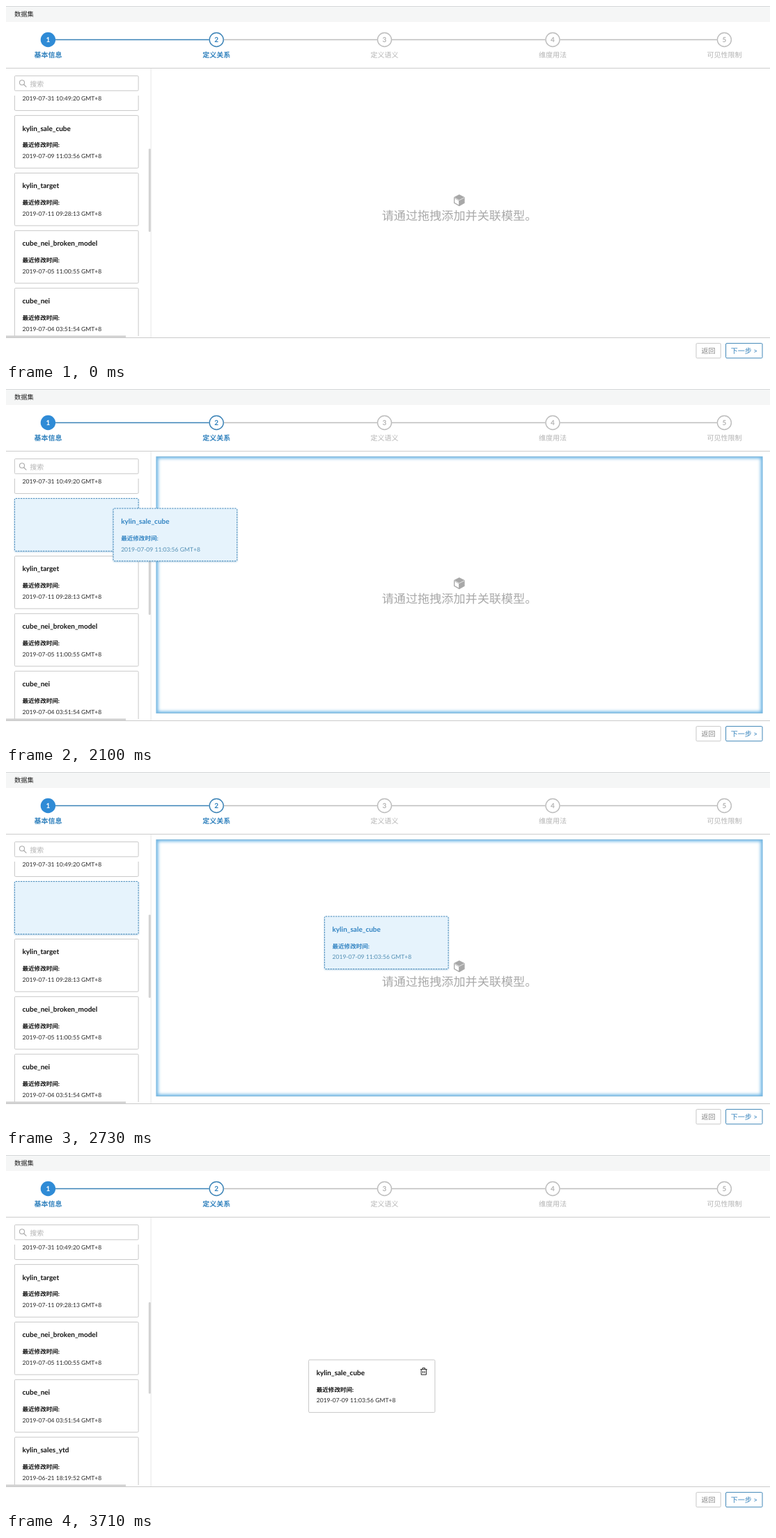
An HTML page that plays this animation: 1097 px wide and 511 px high, repeating every 4.27 s.

```html
<!DOCTYPE html>
<html lang="zh-CN">
<head>
<meta charset="utf-8">
<title>数据集</title>
<style>
  html, body { margin: 0; width: 100%; height: 100%; overflow: hidden; background: #fff; }
  svg { display: block; width: 1097px; height: 511px; }
  text {
    font-family: Lato, "Noto Sans CJK SC", "Noto Sans CJK", sans-serif;
    font-size: 10px;
    text-rendering: geometricPrecision;
    white-space: pre;
  }
  .mid { text-anchor: middle; }
  .bold { font-weight: 700; }
  .small { font-size: 8.57px; }
  .box { fill: #fff; stroke: #c8c8c8; stroke-width: 1; }
  .card { fill: #111; }
  .card .date { fill: #2b2b2b; }
  .blue { fill: #3183c2; }
  .blue .date { fill: #5490b5; }
  .blue .box {
    fill: #e6f3fc;
    stroke: #3f86b8;
    stroke-dasharray: 2.2 1.4;
    filter: drop-shadow(0 1px 1px rgba(70, 140, 190, .45));
  }
</style>
</head>
<body>
<svg id="stage" viewBox="0 0 1097 511" xmlns="http://www.w3.org/2000/svg">
  <defs>
    <clipPath id="listClip"><rect x="0" y="129" width="204" height="346"/></clipPath>
    <clipPath id="zoneClip"><rect x="215.5" y="97" width="871" height="370"/></clipPath>
    <filter id="glow" x="-5%" y="-5%" width="110%" height="110%"><feGaussianBlur stdDeviation="2"/></filter>
  </defs>
  <rect width="1097" height="511" fill="#fff"/>
  <rect width="1097" height="23" fill="#f5f6f6"/>
  <rect width="1097" height="1" fill="#d6d8d9"/>
  <text x="12" y="15.2" style="font-size:9.3px" fill="#222">数据集</text>
  <g id="steps"></g>
  <rect y="89" width="1097" height="1" fill="#cdcdcd"/>

  <rect x="207.6" y="90" width="1" height="387" fill="#e6e6e6"/>
  <rect class="box" x="12.4" y="100.6" width="177.7" height="21.3" rx="1.2"/>
  <g fill="none" stroke="#aaa" stroke-width="1.1" stroke-linecap="round">
    <circle cx="23" cy="110.3" r="3.5"/>
    <path d="M25.6 113L29 116.4"/>
  </g>
  <text x="34.2" y="115.7" fill="#b4b4b4">搜索</text>
  <g clip-path="url(#listClip)">
    <g id="listA"></g>
    <g id="listB"></g>
  </g>
  <rect id="thumb" x="204.8" width="3" rx="1" fill="#d2d2d2"/>

  <g id="zone" clip-path="url(#zoneClip)" fill="none">
    <rect x="215.5" y="97" width="871" height="370" stroke="#6db6e6" stroke-width="6" filter="url(#glow)"/>
    <rect x="216" y="97.5" width="870" height="369" stroke="#82b9db"/>
  </g>
  <g id="hint">
    <path d="M650.8 271.2L658.6 275.2V283.8L650.8 288.2L643 283.8V275.2Z" fill="#a8a8a8"/>
    <path d="M644.3 277.2L650.1 280.2V286.3L644.3 283.1Z" fill="#fff"/>
    <path d="M643.6 275.9L650.8 279.6L658 275.9" fill="none" stroke="#fff" stroke-width=".7"/>
    <text class="mid" x="651" y="308" style="font-size:17.14px" fill="#a9a9a9">请通过拖拽添加并关联模型。</text>
  </g>
  <g id="dropped"></g>

  <rect y="474.4" width="172" height="3.2" fill="#d2d2d2"/>
  <rect y="477" width="1097" height="1" fill="#cbcbcb"/>
  <rect class="box" x="991" y="485.6" width="35.2" height="21.2" rx="1.4"/>
  <text class="mid" x="1008.6" y="499.8" fill="#858585">返回</text>
  <rect class="box" x="1033.6" y="485.6" width="52.4" height="21.2" rx="1.4" style="stroke:#3f86b8"/>
  <text class="mid" x="1059.9" y="499.8" fill="#2f7fba">下一步 &gt;</text>
  <g id="drag"></g>
</svg>
<script>
const LOOP = 4270, TICK = 70;
const PICK = 1470, LIFT = 2030, DROP = 3150, LEAVE = 3710;
const LEFT = 12.4, TOP = 157.6, PITCH = 82.86, CARD_W = 177.7;
const $ = id => document.getElementById(id);

const sale = ['kylin_sale_cube', '2019-07-09 11:03:56 GMT+8'];
const rest = [
  ['kylin_target', '2019-07-11 09:28:13 GMT+8'],
  ['cube_nei_broken_model', '2019-07-05 11:00:55 GMT+8'],
  ['cube_nei', '2019-07-04 03:51:54 GMT+8'],
  ['kylin_sales_ytd', '2019-06-21 18:19:52 GMT+8']
];
const above = ['', '2019-07-31 10:49:20 GMT+8'];

function cardBody([name, date], w = CARD_W) {
  return `<rect class="box" width="${w}" height="75.7" rx="1.4"/>
    <g class="label">
      <text class="bold" x="11.1" y="22">${name}</text>
      <text class="bold small" x="11.1" y="45.7">最近修改时间:</text>
      <text class="date small" x="11.1" y="61.6">${date}</text>
    </g>`;
}

function card(x, y, model, w) {
  return `<g class="card" transform="translate(${x} ${y})">${cardBody(model, w)}</g>`;
}

function fillList(id, models) {
  $(id).innerHTML = [above, ...models]
    .map((m, i) => card(LEFT, TOP + (i - 1) * PITCH, m)).join('');
  return $(id).children[1];
}

function drawSteps() {
  const names = ['基本信息', '定义关系', '定义语义', '维度用法', '可见性限制'];
  const xs = [60.4, 302.2, 543.5, 785, 1031.4];
  $('steps').innerHTML = names.map((name, i) => {
    const on = i < 2, x = xs[i];
    const ink = on ? '#2f80bd' : '#b3b3b3';
    const ring = i ? (on ? '#3a82b6' : '#bdbdbd') : '#2f8bd6';
    const line = i < 4
      ? `<path d="M${x + 10.5} 48.5H${xs[i + 1] - 10.5}" stroke="${i ? '#bdbdbd' : '#3a82b6'}" stroke-width="1.4"/>` : '';
    return `${line}<circle cx="${x}" cy="48.5" r="10" fill="${i ? '#fff' : ring}" stroke="${ring}" stroke-width="1.4"/>
      <text class="mid bold" x="${x}" y="52.1" fill="${i ? ink : '#fff'}">${i + 1}</text>
      <text class="mid ${on ? 'bold' : ''}" x="${x}" y="74.3" fill="${ink}">${name}</text>`;
  }).join('');
}

const trash = `<g fill="none" stroke="#222" stroke-width="1">
  <path d="M595 308.6H604.6M598 308.4V306.6H601.6V308.4M596.2 308.8V316.2H603.4V308.8M598.6 311V314M601 311V314"/></g>`;

drawSteps();
const slotA = fillList('listA', [sale, ...rest.slice(0, 3)]);
const slotB = fillList('listB', rest);
$('dropped').innerHTML = card(434.6, 294.9, sale, 181.3) + trash;
$('drag').innerHTML = card(0, 0, sale);
$('drag').firstChild.classList.add('blue');

// Drag path: end time, x, y and the easing that leads there
const easeIn = p => p ** 1.3;
const easeOut = p => 1 - (1 - p) ** 2;
const easeBoth = p => p * p * (3 - 2 * p);
const path = [
  [LIFT - TICK, LEFT, TOP],
  [2240, 361.2, 192.9, easeIn],
  [2520, 457.2, 207.8, easeOut],
  [2730, 457.4, 207.9, easeBoth],
  [3080, 468.2, 288.7, easeBoth]
];

function dragAt(t) {
  let i = 1;
  while (i < path.length - 1 && t > path[i][0]) i++;
  const [t0, x0, y0] = path[i - 1], [t1, x1, y1, ease] = path[i];
  const p = ease(Math.min(1, Math.max(0, (t - t0) / (t1 - t0))));
  return [x0 + (x1 - x0) * p, y0 + (y1 - y0) * p];
}

const show = (el, on) => { el.style.display = on ? '' : 'none'; };

function render(t) {
  const dragging = t >= LIFT && t < DROP, done = t >= DROP;
  slotA.classList.toggle('blue', t >= PICK);
  slotB.classList.toggle('blue', t < LEAVE);
  show(slotA.querySelector('.label'), !dragging);
  show($('listA'), !done);
  show($('listB'), done);
  show($('zone'), dragging);
  show($('drag'), dragging);
  show($('hint'), !done);
  show($('dropped'), done);
  $('thumb').setAttribute('y', done ? 212 : 205.6);
  $('thumb').setAttribute('height', done ? 131.5 : 119.5);
  $('drag').setAttribute('transform', `translate(${dragAt(t).join(' ')})`);
}

const start = performance.now();
function frame() {
  const t = (performance.now() - start) % LOOP;
  render(Math.floor(t / TICK) * TICK);
  requestAnimationFrame(frame);
}
frame();
</script>
</body>
</html>
```
